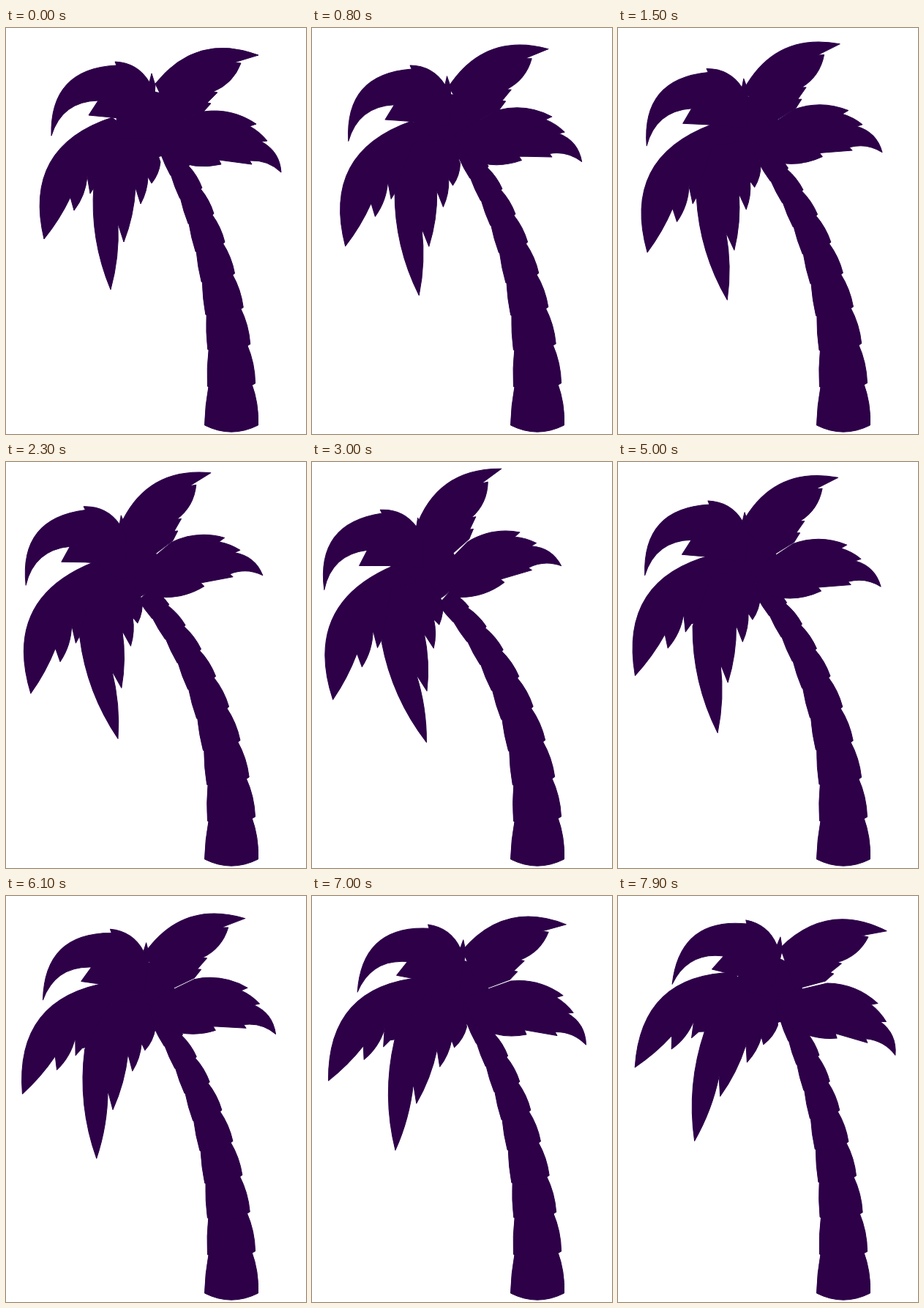
Write an HTML page with a canvas that moves like this. It is 410 px wide and 554 px high and loops after 8000 ms.

```html
<!DOCTYPE html>
<html lang="en">
<head>
<meta charset="utf-8">
<title>Swaying palm</title>
<style>
  html, body { margin: 0; width: 100%; height: 100%; overflow: hidden; background: #fff; }
  canvas { display: block; }
</style>
</head>
<body>
<canvas id="stage" width="410" height="554"></canvas>
<script>
const ctx = document.getElementById('stage').getContext('2d');
const LOOP = 8000, STEP = 100, TURN = 3150;
const rad = deg => deg * Math.PI / 180;

// A leaf sways about its pivot: "lean" and "drift" give the shift, turn in degrees and growth
// at full strength. Corners run counter-clockwise as x, y and the outward bow of the edge leading there.
const leaves = [
  { // upper left
    pivot: [198, 73], lean: [-56, 15, -6, 0], drift: [9, -3, 7, 0],
    corners: [[200, 130], [204, 78], [199, 62], [196, 74], [149, 46, .27], [151, 51], [62, 147, .49],
      [126, 99, -.36], [113, 119], [145, 122]]
  },
  { // upper right
    pivot: [238, 95], lean: [-62, 3, -20.5, -.02], drift: [2, -1, 2, 0],
    corners: [[230, 130], [270, 114], [280, 103], [275, 102], [289, 88], [283, 87], [321, 48, .22],
      [312, 47], [345, 37], [204, 76, .36]]
  },
  { // right
    pivot: [258, 150], lean: [-44, -4, -25, -.02], drift: [1, 2, 3, 0],
    corners: [[205, 140], [225, 178], [294, 186, .18], [291, 180], [336, 186], [333, 181], [376, 197, -.22],
      [349, 155, .28], [357, 154], [333, 134, .1], [342, 131], [270, 114, .19]]
  },
  { // lower left
    pivot: [132, 170], lean: [-31, 24, -5, .06], drift: [-6, -19, 16, 0],
    corners: [[180, 150], [145, 122], [52, 288, .46], [88, 231, .06], [93, 249], [111, 202, .15],
      [115, 226], [122, 215], [165, 200]]
  },
  { // hanging
    pivot: [165, 200], lean: [-30, 20, -15.7, .04], drift: [-4, -14, 11, .05],
    corners: [[200, 150], [150, 150], [120, 215], [143, 357, .12], [153, 267, .08], [161, 292],
      [177, 218, .08], [184, 240], [194, 203, .12], [199, 212], [211, 183, .15]]
  }
];

function fillShape(corners) {
  let [x, y] = corners.at(-1);
  ctx.beginPath();
  ctx.moveTo(x, y);
  for (const [nx, ny, bow = 0] of corners) {
    ctx.quadraticCurveTo((x + nx) / 2 - bow * (ny - y), (y + ny) / 2 + bow * (nx - x), nx, ny);
    [x, y] = [nx, ny];
  }
  ctx.fill();
  ctx.stroke();
}

function drawLeaf({ pivot: [x, y], lean, drift, corners }, leanNow, driftNow) {
  const [dx, dy, turn, grow] = lean.map((v, i) => v * leanNow + drift[i] * driftNow);
  ctx.save();
  ctx.translate(x + dx, y + dy);
  ctx.rotate(rad(turn));
  ctx.scale(1 + grow, 1 + grow);
  ctx.translate(-x, -y);
  fillShape(corners);
  ctx.restore();
}

// Stacked tapering rings, each tilted a little more than the one below
function drawTrunk(lean) {
  const tilt = rad(3.6 + 2 * lean);
  let x = 308, y = 542, half = 36.5;
  for (let i = 0; i < 9; i++) {
    const across = (side, angle) => [x + side * Math.cos(angle), y - side * Math.sin(angle)];
    const angle = i * tilt, length = 55 - 2.9 * i;
    const left = across(-half, angle), right = across(half, angle);
    x -= length * Math.sin(angle);
    y -= length * Math.cos(angle);
    half *= .895;
    fillShape([
      [...left, .04], [...right, .25],
      [...across(half * .85, angle + tilt), .1], across(-half * .95, angle + tilt)
    ]);
  }
}

function draw(t) {
  const back = Math.max(0, t - TURN);
  const lean = back ? 1 - back / 3890 : t / TURN;
  const drift = back / 4750;
  ctx.fillStyle = '#fff';
  ctx.fillRect(0, 0, 410, 554);
  ctx.fillStyle = ctx.strokeStyle = '#2d0048';
  ctx.lineJoin = 'round';
  drawTrunk(lean);
  ctx.beginPath();
  ctx.arc(196 - 45 * lean, 132 + 15 * lean, 46, 0, 2 * Math.PI);
  ctx.fill();
  leaves.forEach(leaf => drawLeaf(leaf, lean, drift));
}

const start = performance.now();
function tick() {
  const t = (performance.now() - start) % LOOP;
  draw(Math.floor(t / STEP) * STEP);
  requestAnimationFrame(tick);
}
tick();
</script>
</body>
</html>
```
